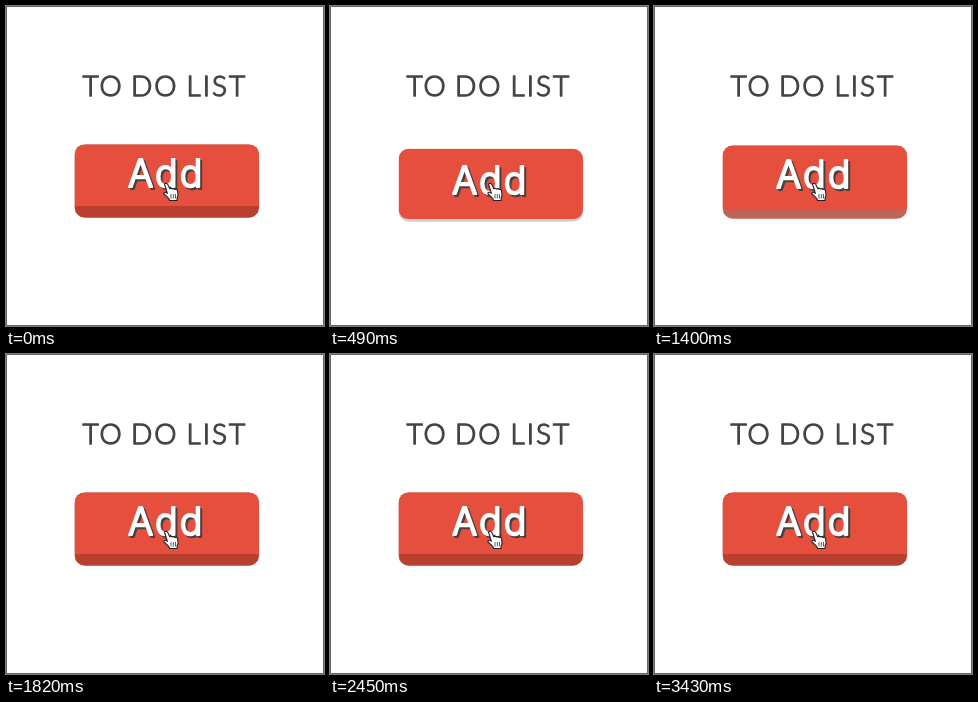
Recreate the animation shown at these times as an HTML page. Size 318 by 320 pixels, loop 3.5 s.

```html
<!DOCTYPE html>
<html lang="en">
<head>
<meta charset="utf-8">
<title>To do list</title>
<style>
  html, body { margin: 0; width: 100%; height: 100%; overflow: hidden; background: #fff; }
  svg { display: block; width: 318px; height: 320px; }
  /* a thin face plus a round stroke gives soft, even letters */
  text { font-weight: 300; stroke-linejoin: round; }
  .title { font-family: Lato, sans-serif; font-size: 28px; letter-spacing: 2px; fill: #444; stroke: #444; stroke-width: 1.3px; }
  .label { font-family: Inter, sans-serif; font-size: 37.5px; letter-spacing: 2px; stroke-width: 2px; }
  .shade { fill: #484040; stroke: #484040; }
  .front { fill: #fff; stroke: #fff; }
</style>
</head>
<body>
<svg viewBox="0 0 318 320">
  <rect x=".5" y=".5" width="317" height="319" fill="none" stroke="#666"/>
  <text class="title" y="89.5"><tspan x="76.5">TO</tspan><tspan x="125">DO</tspan><tspan x="180.500">LIST</tspan></text>
  <rect id="edge" x="68.7" width="184.3" rx="10"/>
  <rect id="face" x="68.7" width="184.3" fill="#e64f3e"/>
  <g id="label">
    <text class="label shade" x="124" y="182.5" aria-hidden="true">Add</text>
    <text class="label front" x="122" y="180.5">Add</text>
  </g>
  <path d="M158.5 178q1.8-1.8 3.3.5l2 4.3q1.5-1.4 2.6.3 1.6-1.2 2.6.4 2-.8 2.5 1.2l.6 4.5-1 2.5v2.8h-7.6l-.6-1.8-4.8-4.7q-.8-2 1.6-1.8l1.7 1.1z"
    fill="#fff" stroke="#222" stroke-width="1.1" stroke-linejoin="round"/>
  <path d="M165 188v4.5M167.3 188v4.5M169.5 188v4.5" stroke="#333" stroke-width=".8"/>
</svg>
<script>
const LOOP = 3500, STEP = 70, RAMP = 140, HOLD = 315;
const presses = [245, 1365, 2135];
const [edge, face, label] = ["edge", "face", "label"].map(id => document.getElementById(id));
const mix = (a, b, p) => a + (b - a) * p;

function place(rect, top, bottom) {
  rect.setAttribute("y", top);
  rect.setAttribute("height", bottom - top);
}

function draw(now) {
  const t = Math.floor(now % LOOP / STEP) * STEP;
  const start = presses.find(s => t >= s && t < s + HOLD);
  const p = start === undefined ? 0 : Math.min(1, (t - start) / RAMP);
  const top = mix(138.4, 142.7, p);
  place(edge, top, mix(211.8, 215.8, p));
  place(face, top, mix(200.2, 213, p));
  // square lower corners at rest, rounded once the button sinks
  const r = mix(0, 9, p);
  face.style.clipPath = `inset(0 round 10px 10px ${r}px ${r}px)`;
  edge.setAttribute("fill", `rgb(${mix(185, 212, p)},${mix(63, 210, p)},${mix(47, 208, p)})`);
  label.setAttribute("transform", `translate(0 ${7 * p})`);
  requestAnimationFrame(draw);
}
requestAnimationFrame(draw);
</script>
</body>
</html>
```
